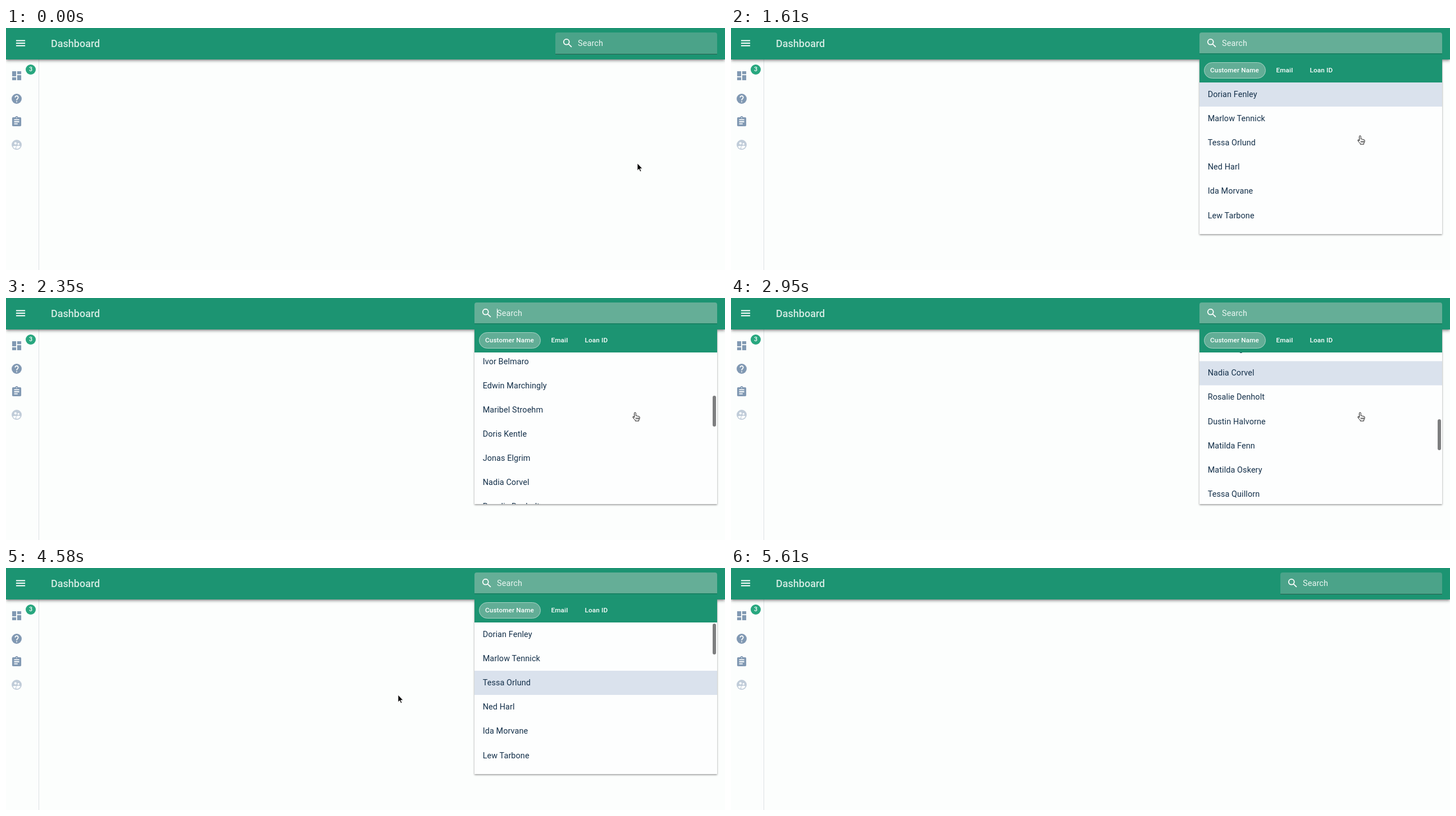
Write an HTML page that moves like this. It is 1280 px wide and 431 px high and loops after 6.06 s.

```html
<!DOCTYPE html>
<html lang="en">
<head>
<meta charset="utf-8">
<title>Dashboard search</title>
<style>
html, body { margin: 0; width: 100%; height: 100%; overflow: hidden; }
body { position: relative; background: #fcfefd; font-family: Roboto, Arial, sans-serif; }
body * { position: absolute; box-sizing: border-box; white-space: nowrap; }
header { left: 0; top: 0; width: 1280px; height: 56px; background: #1c9472;
  box-shadow: 0 2px 4px -1px rgba(0,0,0,.35), 0 3px 5px rgba(0,0,0,.16), 0 1px 9px rgba(0,0,0,.12); }
h1 { margin: 0; left: 80px; top: 0; font: 500 18px/55px Roboto, Arial, sans-serif; color: #d2eae2; }
nav { left: 0; top: 56px; width: 58.5px; height: 375px; border-right: 1px solid #dde1e5; }
svg { overflow: visible; }
svg * { position: static; }
.icon { width: 21.55px; height: 21.55px; transform: translate(-50%, -50%); fill: currentColor; stroke-width: 2; }
.line { fill: none; stroke: currentColor; }
.cut { fill: #fcfefd; }
.cutline { fill: none; stroke: #fcfefd; }
#badge { left: 35px; top: 64.5px; width: 18px; height: 18px; border-radius: 50%; background: #28a77f;
  color: #fff; font: 500 10.8px/18px Roboto, Arial, sans-serif; text-align: center; }
#field { right: 14px; top: 8px; height: 38.5px; border-radius: 4px 4px 0 0; }
#field span { left: 40px; top: 0; font-size: 14.4px; line-height: 39px; letter-spacing: .01em; color: #e9f5f1; }
#caret { left: 40px; top: 11px; width: 1px; height: 17px; background: #fff; }
#panel { left: 834px; top: 55px; width: 432px; height: 311.5px; background: #fdfefe;
  box-shadow: 0 1.5px 3px rgba(0,0,0,.42); }
#tabs { left: 0; top: 0; width: 100%; height: 42px; background: #1c9472;
  color: #fff; font: 500 11.7px/28px Roboto, Arial, sans-serif; letter-spacing: .15px; }
#tabs span { top: 6px; }
#pill { left: 7.5px; top: 6px; width: 110.5px; height: 28.5px; border-radius: 15px;
  background: #62ad96; border: 1px solid #a9d4c6; }
#view { left: 0; top: 42px; width: 100%; height: 269.5px; overflow: hidden; }
#list { left: 0; top: 0; width: 100%; }
#list div { left: 0; width: 100%; height: 43.1px; padding-left: 14.7px; font-size: 14.4px;
  line-height: 43px; letter-spacing: .007em; color: #14304a; }
#thumb { right: 2px; top: 1.5px; width: 6.5px; height: 55px; border-radius: 4px; background: #7d7e7f; }
#cursor { left: 0; top: 0; width: 1px; height: 1px; stroke-linejoin: round; }
</style>
</head>
<body>
<nav></nav>
<header><h1>Dashboard</h1></header>
<div id="badge">3</div>
<div id="panel">
  <div id="tabs">
    <div id="pill"></div>
    <span style="left:19px">Customer Name</span>
    <span style="left:136.5px">Email</span>
    <span style="left:196.5px">Loan ID</span>
  </div>
  <div id="view"><div id="list"></div><div id="thumb"></div></div>
</div>
<div id="field"><span>Search</span><div id="caret"></div></div>
<svg id="cursor">
  <path id="arrow" d="M0 0v12.8l2.9-2.7 2 4.7 2-.9-2-4.5h4z" stroke="#fff" stroke-width=".8"/>
  <path id="hand" d="M-1.5 9V1.3a1.4 1.4 0 0 1 2.8 0V6q1.4-1 2.4.3 1.5-.6 2.3.7 2.2-.4 2.2 1.6 0 3-1.6 4.6V15H.2v-1.4Q-2 11.5-4 8.6q-.6-1.4 1-1.5zM1.8 9v3M4 9v3M6 9v3" fill="#fff" stroke="#111"/>
  <path id="beam" d="M-2.5 0Q0 0 0 2V13Q0 15-2.5 15M2.5 0Q0 0 0 2M0 13Q0 15 2.5 15" fill="none" stroke="#111"/>
</svg>
<script>
const $ = id => document.getElementById(id);
const LOOP = 6060, STEP = 147.6, LAST = 38;
const ROW = 43.1, LIST_TOP = 97, PANEL_LEFT = 834;
const OPEN = 1030, CLOSE = 4870, BLINK = 500;

const ICONS = {
  menu: '<path class="line" d="M3 7h18M3 12h18M3 17h18"/>',
  tiles: '<path d="M3 3h8v10H3zM3 15h8v6H3zM13 3h8v6h-8zM13 11h8v10h-8z"/>',
  help: '<circle cx="12" cy="12" r="10"/><path class="cutline" d="M9 9.5a3 3 0 1 1 5 2.1Q12 13 12 15M12 17v2"/>',
  task: '<rect x="3" y="3" width="18" height="18" rx="2"/><circle cx="12" cy="4" r="3"/>' +
    '<circle class="cut" cx="12" cy="4" r="1"/><path class="cutline" d="M7 8h10M7 12h10M7 16h7"/>',
  users: '<circle cx="12" cy="12" r="10"/><circle class="cut" cx="9.6" cy="9.1" r="2.4"/>' +
    '<circle class="cut" cx="15.6" cy="10.3" r="1.9"/>' +
    '<path class="cut" d="M4.5 15.5Q6 13.8 11.5 14.4 9.5 15.5 9.6 19.6 6 18.5 4.5 15.5zM11.2 20v-4q3-4 8.2-1-2 5-8.2 5z"/>',
  search: '<circle class="line" cx="9.5" cy="9.5" r="5.5"/><path class="line" d="M14 14l5.7 5.7"/>'
};
const NAMES = ["Dorian Fenley", "Marlow Tennick", "Tessa Orlund", "Ned Harl", "Ida Morvane", "Lew Tarbone",
  "Kirsten Dowell", "Bram Ostley", "Ivor Belmaro", "Edwin Marchingly", "Maribel Stroehm", "Doris Kentle",
  "Jonas Elgrim", "Nadia Corvel", "Rosalie Denholt", "Dustin Halvorne", "Matilda Fenn", "Matilda Oskery",
  "Tessa Quillorn", "Bettina Salvero", "Imogen Dalby", "Matilda Wendrow", "Gordon Pellam", "Leonie Harst",
  "Wesley Tarnow"];

function addIcon(name, x, y, color, parent = document.body) {
  parent.insertAdjacentHTML("beforeend",
    `<svg class="icon" viewBox="0 0 24 24" style="left:${x}px;top:${y}px;color:${color}">${ICONS[name]}</svg>`);
}
addIcon("menu", 26, 27, "#fff");
["tiles", "help", "task", "users"].forEach((name, i) =>
  addIcon(name, 18.8, 84.5 + i * 41.3, name === "users" ? "#c0ccd9" : "#8199b3"));
addIcon("search", 21.6, 19, "#fff", $("field"));
document.body.append($("cursor"));

const rows = NAMES.map((name, i) => {
  const row = document.createElement("div");
  row.textContent = name;
  row.style.top = i * ROW + "px";
  $("list").append(row);
  return row;
});

const START = { x: 1124, y: 241 };
const MOVES = [
  { from: 0, to: 738, x: 1120, y: 20 },
  { from: 1330, to: 1620, x: 1120, y: 192 },
  { from: 1620, to: 1770, x: 1120, y: 204 },
  { from: 4280, to: 4570, x: 698, y: 226 },
  { from: CLOSE, to: 5400, x: 1262, y: 402 }
];
const FLICKS = [
  { from: 1762, to: 2650, by: 465 },
  { from: 2804, to: 3244, by: 302 },
  { from: 3542, to: 4321, by: -767 }
];

// Smoothstep from 0 to 1 between two times.
function ease(t, from, to) {
  const u = Math.max(0, Math.min(1, (t - from) / (to - from)));
  return u * u * (3 - 2 * u);
}
const pulse = (t, on, off, rise, fall) => ease(t, on, on + rise) - ease(t, off, off + fall);

function cursorAt(t) {
  return MOVES.reduce((p, m) => {
    const u = ease(t, m.from, m.to);
    return { x: p.x + (m.x - p.x) * u, y: p.y + (m.y - p.y) * u };
  }, START);
}
const scrollAt = t => FLICKS.reduce((s, f) => s + f.by * ease(t, f.from, f.to), 0);
const restAt = t => FLICKS.reduce((s, f) => s + (t >= f.to ? f.by : 0), 0);

// The highlight lags one step and only changes row while the list rests.
function hoveredRow(t) {
  const { x, y } = cursorAt(t - STEP), tip = y + 9 - LIST_TOP;
  return x > PANEL_LEFT && tip > 0 ? Math.floor((tip + restAt(t)) / ROW) : -1;
}

function draw(now) {
  const k = Math.min(LAST, Math.floor((now % LOOP + 25) / STEP)), t = k * STEP;
  const focused = t >= OPEN && t < CLOSE;
  const glow = ease(t, 440, 738) / 2 + ease(t, OPEN, OPEN + 150) / 2 - ease(t, CLOSE, 5600);
  const mix = (a, b) => a + (b - a) * glow;

  const field = $("field").style;
  field.width = 288 + 144 * pulse(t, OPEN - 80, CLOSE, 220, 290) + "px";
  field.background = `rgb(${mix(75, 101)},${mix(163, 174)},${mix(137, 151)})`;
  field.borderBottom = focused ? "2px solid #1b8365" : "1px solid #275f4e";
  $("caret").style.opacity = focused && (t - OPEN) % (2 * BLINK) < BLINK ? 1 : 0;

  const scroll = scrollAt(t), hover = hoveredRow(t);
  $("panel").style.opacity = pulse(t, OPEN, CLOSE - 80, 290, 220);
  $("list").style.transform = `translateY(${-scroll}px)`;
  $("thumb").style.transform = `translateY(${scroll * .2148}px)`;
  $("thumb").style.opacity = pulse(t, 1700, 4600, 150, 200);
  rows.forEach((row, i) => row.style.background = i === hover ? "#dae2ed" : "none");

  const { x, y } = cursorAt(t);
  const kind = y < 48 ? "beam" : focused && x > PANEL_LEFT ? "hand" : "arrow";
  for (const id of ["arrow", "hand", "beam"]) $(id).style.display = id === kind ? "" : "none";
  $("cursor").style.transform = `translate(${x}px,${y}px)`;
  $("cursor").style.opacity = t < 5400 ? 1 : 0;
}

const start = performance.now();
function tick() {
  draw(performance.now() - start);
  requestAnimationFrame(tick);
}
tick();
</script>
</body>
</html>
```
